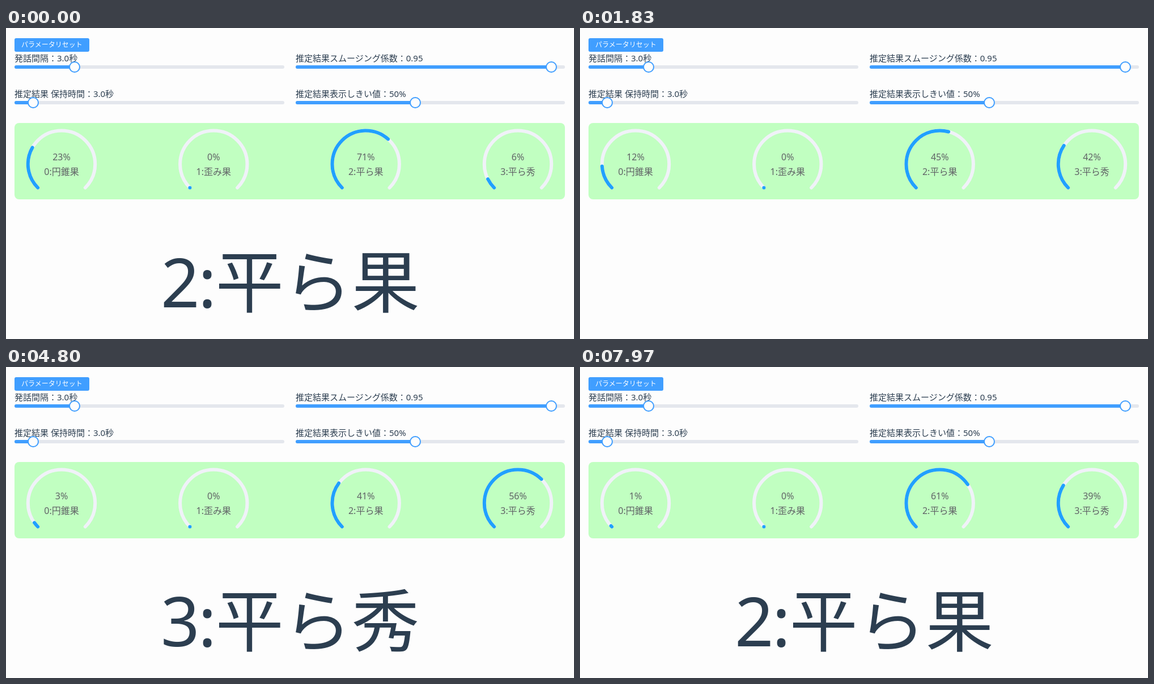
An HTML page for the animation above (8 s loop, 1002 by 550 pixels).

```html
<!DOCTYPE html>
<html lang="ja">
<head>
<meta charset="utf-8">
<style>
  html, body { margin: 0; width: 100%; height: 100%; overflow: hidden; background: #fdfdfd; }
  svg { display: block; font-family: "Noto Sans", "Noto Sans CJK JP", sans-serif; }
  .label { font-size: 15px; fill: #2c3e50; }
  .gauge { font-size: 16px; fill: #606266; text-anchor: middle; }
  .arc { fill: none; stroke-width: 6; stroke-linecap: round; }
</style>
</head>
<body>
<svg id="stage" width="1002" height="550" viewBox="0 0 1002 550"></svg>
<script>
const BLUE = '#409eff', PAPER = '#fdfdfd';
const LOOP = 8000, FPS = 30, FRAMES = 240;
const RATE = 0.54, ARC_LAG = 0.41;
const names = ['円錐果', '歪み果', '平ら果', '平ら秀'];
const centers = [98, 366.3, 634.7, 903];
const stage = document.getElementById('stage');

// Label, left edge, width, track height on the page, knob position
const sliders = [
  ['発話間隔：3.0秒', 15, 476, 69, 121],
  ['推定結果スムージング係数：0.95', 511, 475, 69, 962],
  ['推定結果 保持時間：3.0秒', 15, 476, 132, 48],
  ['推定結果表示しきい値：50%', 511, 475, 132, 722],
];

const bar = (x, y, w, h, r, fill) =>
  `<rect x="${x}" y="${y}" width="${w}" height="${h}" rx="${r}" fill="${fill}"/>`;

const slider = ([text, x, w, y, knob]) =>
  `<text class="label" x="${x}" y="${y - 10}">${text}</text>` +
  bar(x, y - 3, w, 6, 3, '#e4e7ed') +
  bar(x, y - 3, knob - x, 6, 3, BLUE) +
  `<circle cx="${knob}" cy="${y}" r="9" fill="${PAPER}" stroke="${BLUE}" stroke-width="2"/>`;

const arc = (x, attrs) =>
  `<path class="arc" pathLength="100" d="M${x - 41.85} 282.5a59.2 59.2 0 1 1 83.7 0" ${attrs}/>`;

const gauge = (x, i) =>
  arc(x, 'stroke="#f0f2f8"') + arc(x, `id="arc${i}" stroke="#20a0ff"`) +
  `<text class="gauge" id="pct${i}" x="${x}" y="233.7"></text>` +
  `<text class="gauge" x="${x}" y="259.5">${i}:${names[i]}</text>`;

stage.innerHTML =
  bar(15, 18, 132, 24, 3, BLUE) +
  '<text x="27" y="33.5" font-size="12" fill="#fff">パラメータリセット</text>' +
  sliders.map(slider).join('') +
  bar(15, 168, 971, 135, 8, '#c1ffc1') +
  centers.map(gauge).join('') +
  '<text id="result" x="273 339 369.7" y="493.7" font-size="120" fill="#2c3e50"></text>';

const find = id => document.getElementById(id);
const arcs = names.map((_, i) => find('arc' + i));
const pcts = names.map((_, i) => find('pct' + i));
const result = find('result');

// Classifier output held until the given step; the shown values drift towards it
const inputs = [
  [9, [0, 0, 1, 0]],
  [27, [0.233, 0, 0.748, 0.019]],
  [55, [0, 0, 0, 1]],
  [88, [0.01, 0, 0.05, 0.94]],
  [123, [0, 0, 0, 1]],
  [144, [0, 0, 0.985, 0.015]],
  [171, [0.01, 0, 0.93, 0.06]],
  [222, [0, 0, 0.97, 0.03]],
  [FRAMES, [0, 0, 0, 1]],
];

function simulate() {
  const k = 1 - Math.exp(-RATE / FPS), kArc = 1 - Math.exp(-1 / FPS / ARC_LAG);
  let value = [0.23, 0, 0.71, 0.06], sweep = [0.276, 0, 0.654, 0.068];
  const states = [];
  for (let n = 0; n < FRAMES; n++) {
    states.push({ value, sweep });
    const target = inputs.find(([end]) => n < end)[1];
    value = value.map((v, i) => v + (target[i] - v) * k);
    sweep = sweep.map((s, i) => s + (value[i] - s) * kArc);
  }
  return states;
}

const states = simulate();

function draw(ms) {
  const n = Math.min(FRAMES - 1, Math.floor((ms + 4) * FPS / 1000));
  const { value, sweep } = states[n];
  value.forEach((v, i) => {
    pcts[i].textContent = Math.round(v * 100) + '%';
    arcs[i].setAttribute('stroke-dasharray', `${(sweep[i] * 100).toFixed(2)} 200`);
  });
  const best = value.findIndex(v => v >= 0.5);
  result.textContent = best < 0 ? '' : `${best}:${names[best]}`;
}

const start = performance.now();
function tick() {
  draw((performance.now() - start) % LOOP);
  requestAnimationFrame(tick);
}
tick();
</script>
</body>
</html>
```
